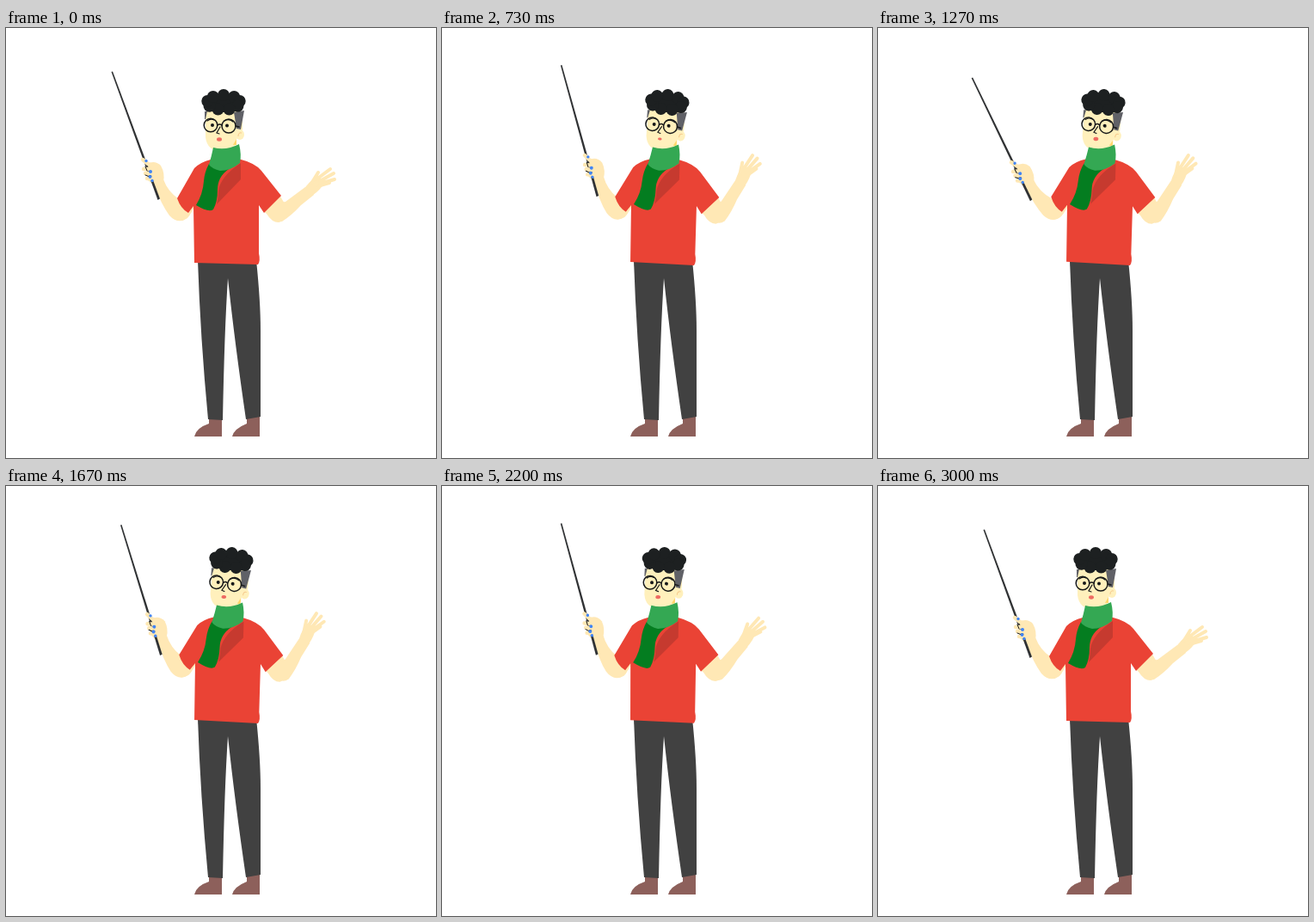
These frames come from a looping animation (500x500 px, 3030 ms). An HTML page:

```html
<!DOCTYPE html>
<html lang="en">
<head>
<meta charset="utf-8">
<title>Teacher with pointer</title>
<style>
  html, body { margin: 0; width: 100%; height: 100%; overflow: hidden; background: #fff; }
  svg { display: block; width: 100%; height: 100%; }
  .skin { fill: #ffe8b5; }
  .face { fill: #fff0bc; }
  .finger { fill: none; stroke: #ffe8b5; stroke-linecap: round; stroke-linejoin: round; }
  .line { fill: none; stroke: #161819; stroke-linecap: round; }
</style>
</head>
<body>
<svg viewBox="0 0 500 500">
  <!-- legs -->
  <g fill="#8d605b">
    <path d="M219 475Q221 465 236 460V453H251V475Z"/>
    <path d="M263 475Q265 466 280 460V452H295V475Z"/>
  </g>
  <path fill="#414141" d="M223 270H291Q296 318 296 352V452L279 455Q266 366 258 291Q254 350 252 456L235 455Q226 360 223 270Z"/>

  <g id="body">
    <!-- arm with pointer -->
    <path class="skin" d="M203 200L219 207Q213 223 203 224 194 222 195 212Z"/>
    <g id="leftArm">
      <path class="skin" d="M171 180Q181 206 190 218 200 229 211 221 217 215 213 207L201 199Q188 190 183 176Z"/>
      <path class="skin" d="M164 158Q173 153 180 160 185 169 183 178L173 184 164 176Z"/>
      <path fill="#303234" d="M122.500 51L124 50.500 179 198.500 176.500 200Z"/>
      <path class="finger" stroke-width="4.400" d="M172 160L165 158 159 153M174 164H160M174 169H162M174 175H164"/>
      <path class="line" d="M162 161L164 166M162 171L167 173"/>
      <g fill="#4285f4">
        <circle cx="163" cy="154.500" r="1.700"/>
        <circle cx="168" cy="167" r="2"/>
        <circle cx="167.500" cy="173" r="2"/>
        <circle cx="170" cy="177.500" r="1.700"/>
      </g>
    </g>

    <!-- free arm -->
    <path class="skin" d="M298 212L318 194 325 206Q325 224 317 226 309 226 303 216Z"/>
    <g id="rightArm">
      <path class="skin" d="M306 212Q309 228 321 225 332 218 343 206L358 194 352 182 325 202 313 204Z"/>
      <path class="skin" d="M349 184Q355 176 363 172L371 179Q366 188 356 195Z"/>
      <path class="finger" stroke-width="4" d="M355 181L363 168M361 176L377 164M365 178L381 169M365 181L382 176M362 184L376 180"/>
    </g>

    <!-- shirt -->
    <path fill="#ea4335" d="M238 153Q226 156 219 163L199 198Q203 210 212 215L218 207 219 273 293 275Q296 271 294 262V206L300 215 320 195 297 166Q290 157 270 152Z"/>
    <path fill="#c63a2f" d="M273 157V176L245 205Q247 196 247 189 250 172 273 157Z"/>

    <g id="head">
      <path class="face" d="M232 97V127Q234 143 250 143L266 143 267 131 275 118V97Z"/>
      <path fill="#ffd66b" d="M264 136L268 129V136Z"/>
      <ellipse class="face" cx="272" cy="124" rx="5" ry="6"/>
      <path fill="none" stroke="#f6c98c" d="M270 126Q270 121 274 122"/>
      <path fill="#606167" d="M265 98L277 96 273 118 268 117ZM231 97H234L232 106H231Z"/>
      <g id="hair" fill="#1d2021">
        <ellipse cx="253" cy="87" rx="20" ry="11"/>
      </g>
      <g class="line" stroke-width="1.500">
        <circle cx="238" cy="113" r="7.800"/>
        <circle cx="259" cy="114" r="8"/>
        <path d="M246 113Q248 111 251 113M267 114L271 115"/>
        <path stroke-width="1.200" d="M234 108Q238 105 242 107M254 108Q259 105 264 109M249 115L245 122 248 123"/>
      </g>
      <circle cx="240" cy="113" r="2" fill="#161819"/>
      <circle cx="257" cy="113.500" r="2" fill="#161819"/>
      <ellipse id="mouth" cx="248" cy="129.500" fill="#ef6a62"/>
    </g>

    <!-- scarf -->
    <path fill="#047d20" d="M236 158L259 164Q246 173 246 188 246 202 241 211 236 215 221 206 229 193 230 178 231 167 236 158Z"/>
    <path fill="#34a853" d="M241 139Q256 143 271 135 274 147 272 157 261 166 249 166 240 164 236 159 239 149 241 139Z"/>
  </g>
</svg>
<script>
const LOOP = 3030, CURLS = 9;
const $ = id => document.getElementById(id);

// ring of curls around the hair
for (let i = 0; i < CURLS; i++) {
  const a = (i / CURLS - .25) * 2 * Math.PI;
  const x = 253 + 19 * Math.cos(a), y = 86.5 + 8.5 * Math.sin(a);
  $('hair').insertAdjacentHTML('beforeend', `<circle cx="${x}" cy="${y}" r="7"/>`);
}

const ramp = (t, from, to) => Math.min(1, Math.max(0, (t - from) / (to - from)));
const easeOut = u => 1 - (1 - u) ** 2;

// lean to the right, hold, then return
const sway = t => ramp(t, 40, 740) - ramp(t, 1660, 3000);

// pointer: up, down, up again, settle
const point = t => 7.2 * ramp(t, 40, 510) - 15.8 * ramp(t, 510, 1340)
  + 16.2 * ramp(t, 1340, 1880) - 7.6 * easeOut(ramp(t, 1880, 3000));

const talk = t => .7 + .3 * Math.cos(7 * 2 * Math.PI * t / LOOP);

const turn = (id, angle, x, y) => $(id).setAttribute('transform', `rotate(${angle} ${x} ${y})`);

function draw(t) {
  const s = sway(t), m = talk(t);
  turn('body', 1.7 * s, 257, 274);
  turn('head', 3 * s, 255, 150);
  turn('rightArm', -21.5 * s, 317, 207);
  turn('leftArm', point(t), 204, 215);
  $('mouth').setAttribute('rx', 1.2 + 1.8 * m);
  $('mouth').setAttribute('ry', .5 + 1.7 * m);
}

const start = performance.now();
(function tick() {
  draw((performance.now() - start) % LOOP);
  requestAnimationFrame(tick);
})();
</script>
</body>
</html>
```
